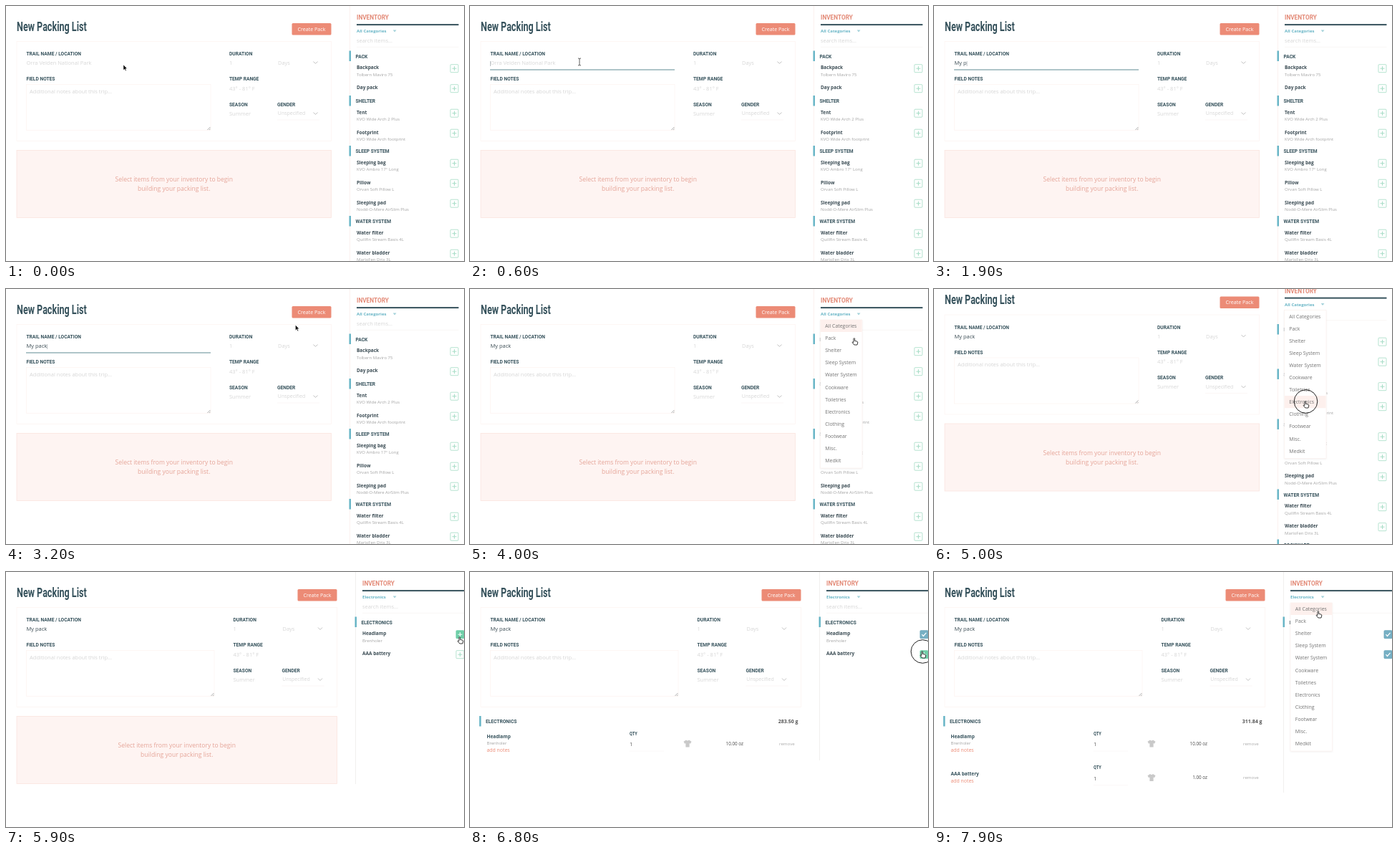
An HTML page for the animation above (8000 ms loop, 640 by 356 pixels).

```html
<!DOCTYPE html>
<html lang="en">
<head>
<meta charset="utf-8">
<title>New Packing List</title>
<style>
html, body { margin: 0; width: 100%; height: 100%; overflow: hidden; background: #fff; }
svg { display: block; width: 100%; height: 100%; font-family: "Open Sans", sans-serif; }
.head { font-family: Roboto, sans-serif; }
.menu { filter: drop-shadow(0 1px 1px rgba(0, 0, 0, .05)); }
</style>
</head>
<body>
<svg id="stage" viewBox="0 0 640 356"></svg>
<script>
const LOOP = 8000, STEP = 100;
const INK = '#36525c', DARK = '#3b4c54', TEAL = '#68b5c6', SALMON = '#ec8b76', GREEN = '#a4dcc5',
  PALE = '#d6d6d6', GREY = '#a3a3a3', BLUSH = '#fdf4f2';

const categories = ['All Categories', 'Pack', 'Shelter', 'Sleep System', 'Water System', 'Cookware',
  'Toiletries', 'Electronics', 'Clothing', 'Footwear', 'Misc.', 'Medkit'];
const inventory = [
  ['PACK', ['Backpack', 'Tolbern Maviro 75'], ['Day pack']],
  ['SHELTER', ['Tent', 'KVO Wide Arch 2 Plus'], ['Footprint', 'KVO Wide Arch footprint']],
  ['SLEEP SYSTEM', ['Sleeping bag', 'KVO Ambro 17° Long'], ['Pillow', 'Orvan Soft Pillow L'],
    ['Sleeping pad', 'Nodd-O-Mere AirSlim Plus']],
  ['WATER SYSTEM', ['Water filter', 'Quillfin Stream Basis 4L'], ['Water bladder', 'MarloFen Drix 3L']],
  ['COOKWARE']
];
const electronics = [['ELECTRONICS', ['Headlamp', 'Brenholer'], ['AAA battery']]];

// time, x, y, pointer shape until the next key
const path = [
  [0, 164, 82, 'arrow'], [100, 164, 82, 'arrow'], [400, 153, 78, 'beam'], [1000, 153, 78, ''],
  [2900, 153, 78, 'arrow'], [3400, 541, 35, 'hand'], [3800, 541, 35, 'hand'], [4000, 537, 69, 'hand'],
  [4800, 519, 157, 'hand'], [5300, 519, 157, 'arrow'], [5800, 634, 91, 'hand'], [6300, 634, 91, 'hand'],
  [6600, 632, 111, 'hand'], [7100, 632, 111, 'arrow'], [7500, 541, 36, 'hand'], [7700, 541, 36, 'hand'],
  [7900, 537, 55, 'hand'], [LOOP, 537, 55, 'hand']
];
const clicks = [400, 3500, 4900, 6100, 6700, 7500];
const keyTimes = [1000, 1400, 1500, 1900, 2000, 2100, 2100];
const pointers = {
  '': '',
  arrow: '<path d="M0 0V7.6L1.8 6 3 8.6 4.2 8 3 5.5H5.3Z" stroke="#fff" stroke-width=".5"/>',
  beam: '<path d="M-2-5Q0-5 0-4V4Q0 5-2 5M2-5Q0-5 0-4M0 4Q0 5 2 5" fill="none" stroke="#333" stroke-width=".8"/>',
  hand: '<path d="M-1 .5C-1-.6 .7-.6 .7 .5V3.4L4 4.2Q5 4.6 4.8 6L4 9H0L-3 5.6Q-2.5 4.4-1 5.5Z" fill="#fff" stroke="#222" stroke-width=".9"/>'
};

const ease = p => { p = Math.max(0, Math.min(1, p)); return p * p * (3 - 2 * p); };
const text = (x, y, s, size, fill, more = '') =>
  `<text x="${x}" y="${y}" font-size="${size}" fill="${fill}" ${more}>${s}</text>`;
const bold = (x, y, s, size, fill, more = '') => text(x, y, s, size, fill, 'font-weight="700" ' + more);
// headings use one condensed face
const head = (x, y, s, size = 7.75, fill = INK) =>
  `<g transform="translate(${x} ${y}) scale(.86 1)" class="head">${bold(0, 0, s, size, fill)}</g>`;
const rect = (x, y, w, h, fill, more = '') =>
  `<rect x="${x}" y="${y}" width="${w}" height="${h}" fill="${fill}" ${more}/>`;
const line = (d, stroke, w = 1) => `<path d="${d}" fill="none" stroke="${stroke}" stroke-width="${w}"/>`;

function pointerAt(t) {
  const i = Math.max(0, path.findIndex(k => k[0] > t) - 1);
  const [t0, x0, y0, shape] = path[i], [t1, x1, y1] = path[i + 1];
  const p = ease((t - t0) / (t1 - t0));
  return { x: x0 + (x1 - x0) * p, y: y0 + (y1 - y0) * p, shape };
}

function nameField(t, right) {
  const typed = keyTimes.filter(k => k <= t).length;
  const focused = t >= 500 && t < 3500;
  const last = typed ? keyTimes[typed - 1] : 500;
  const caret = focused && (t - last) % 1000 < 500 ? `<tspan dx="-1.7" font-weight="300">|</tspan>` : '';
  return (typed ? '' : text(28.5, 82.2, 'Orra Velden National Park', 7.5, PALE)) +
    text(28.5, 82.2, 'My pack'.slice(0, typed) + caret, 7.5, DARK) +
    (focused ? line(`M28 89H${right}`, '#5f8b93') : '');
}

function form(t, wide) {
  const edge = wide ? 462.5 : 454.5, a = wide ? 317.5 : 312, b = wide ? 385.5 : 379, r = wide ? 291 : 286;
  const chevron = y => line(`M${b + 50.5} ${y - 1.5}l3 3 3-3`, '#c2c2c2');
  return `<g transform="translate(15 34.5) scale(.7 1)" class="head">${text(0, 0, 'New Packing List', 18, INK, 'font-weight="600"')}</g>` +
    rect(edge - 55, 24, 55, 16.5, SALMON, 'rx="1.5"') +
    text(edge - 27.5, 34.6, 'Create Pack', 7.1, '#fff', 'text-anchor="middle"') +
    rect(15, 49.5, edge - 15, 139, 'none', `stroke="${BLUSH}" stroke-width=".8"`) +
    head(28.5, 69.2, 'TRAIL NAME / LOCATION') + nameField(t, r) +
    head(28.5, 104.2, 'FIELD NOTES') +
    rect(28.5, 109.5, r - 28.5, 64, 'none', `stroke="${BLUSH}" stroke-width=".8"`) +
    text(33, 121.6, 'Additional notes about this trip...', 7.55, PALE) +
    line(`M${r - 4.5} 173l4-4M${r - 2} 173l1.5-1.5`, '#888', .7) +
    head(a, 69.2, 'DURATION') + text(a, 82.2, '1', 7.5, PALE) +
    text(b + 1, 82, 'Days', 7.4, PALE) + chevron(79) +
    head(a, 104.2, 'TEMP RANGE') + text(a, 117.6, '43° - 81° F', 7.5, PALE) +
    head(a, 139.7, 'SEASON') + text(a, 152.8, 'Summer', 7.5, PALE) +
    head(b, 139.7, 'GENDER') + text(b + .8, 152.4, 'Unspecified', 7, PALE) + chevron(150) +
    line(`M${b} 159H${b + 59}`, '#faf5f4', .8);
}

function emptyPanel(wide) {
  const edge = wide ? 462.5 : 454.5, mid = (15 + edge) / 2;
  const center = (y, s) => text(mid, y, s, 8.55, '#e5a498', 'text-anchor="middle"');
  return rect(15, 201.5, edge - 15, 94, '#fef4f2', 'stroke="#fae4df" stroke-width=".8"') +
    center(245.4, 'Select items from your inventory to begin') + center(258.3, 'building your packing list.');
}

function packRow(y, [name, brand], weight) {
  const top = brand ? y - 7.5 : y - 2.7;
  return bold(23.5, top, name, 6.5, INK) +
    (brand ? text(23.5, y + 1.7, brand, 6, GREY) : '') +
    text(23.5, brand ? y + 11.5 : y + 7, 'add notes', 6.9, SALMON) +
    head(223, y - 11.6, 'QTY', 6.6) + text(223, y + 3.6, '1', 7.5, '#555') +
    line(`M223 ${y + 10.5}h48`, '#faf7f6', .8) +
    `<path d="M302 ${y - 5}q2 2 4 0l3.5 2.2-1.5 3-1.4-.7v5.5h-5.2v-5.5l-1.4 .7-1.5-3Z" fill="#c9c9c9"/>` +
    text(382, y + 2.4, weight, 6.3, '#444', 'text-anchor="end"') + text(432, y + 2, 'remove', 6.15, '#aaa');
}

function packList(added) {
  return rect(13, 201, 2.5, 14.5, TEAL) + head(22, 211.3, 'ELECTRONICS') +
    bold(458.5, 211, added > 1 ? '311.84 g' : '283.50 g', 7, '#555', 'text-anchor="end"') +
    packRow(239.5, electronics[0][1], '10.00 oz') +
    (added > 1 ? packRow(287, electronics[0][2], '1.00 oz') : '');
}

function toggle(x, y, state) {
  const plus = c => line(`M${x - 3} ${y}h6M${x} ${y - 3}v6`, c);
  const box = (fill, stroke) => rect(x - 5.5, y - 5.5, 11, 11, fill, `rx="1" stroke="${stroke}" stroke-width=".8"`);
  if (state === 'done') return box('#77b0c4', '#6aa5ba') + line(`M${x - 3} ${y}l2 2.3 4-4.6`, '#fff', 1.2);
  return state === 'hover' ? box('#6fcfa8', '#6fcfa8') + plus('#fff') : box('#fff', GREEN) + plus(GREEN);
}

function sidebar(wide, added, cursor) {
  const x = wide ? 488.5 : 480.5;
  const bottom = !wide ? 380 : [296, 263, 308][added];
  let y = 70, n = 0;
  let out = line(`M${x} 0V${bottom}`, wide ? '#eeebea' : '#fbedeb', .8) +
    head(x + 9.5, 19.3, 'INVENTORY', 9.6, '#e38a77') +
    rect(x + 9.5, 25.1, 142.5, 2, INK) +
    bold(x + 9.5, 37.4, wide ? 'Electronics' : 'All Categories', 6.05, TEAL) +
    '<path d="M540.7 33.4h4.8l-2.4 3.2Z" fill="#a3d2da"/>' +
    text(x + 9.5, 50.7, 'search items...', 7.45, PALE) + line(`M${x + 9.5} 57.3h142.5`, '#f8f4f3', .8);
  for (const [title, ...items] of wide ? electronics : inventory) {
    out += rect(x - 1, y - 7.5, 2.5, 14.5, TEAL) + head(x + 8, y + 2.6, title);
    y += 16;
    for (const [name, brand] of items) {
      const hover = wide && cursor.x > 628 && Math.abs(cursor.y - y - 1) < 6;
      out += bold(x + 9.5, y + 2.3, name, 6.5, DARK) +
        (brand ? text(x + 9.5, y + 11.6, brand, 6, GREY) : '') +
        toggle(x + 146, y + 1.2, wide && n < added ? 'done' : hover ? 'hover' : '');
      y += 28;
      n++;
    }
    const last = items[items.length - 1];
    y += last && last[1] ? -2 : -9.5;
  }
  return out;
}

function menu(wide, hover) {
  const x = wide ? 498 : 489.5;
  const row = Math.floor((hover.y - 42.7) / 17.1);
  return rect(x, 43, 58.5, 207, '#fff', 'class="menu" stroke="#faeeeb" stroke-width=".6"') +
    (row >= 0 && row < categories.length ? rect(x + .4, 42.9 + row * 17.1, 57.7, 17.1, '#fdf0ed') : '') +
    categories.map((c, i) => text(x + 6.8, 54 + i * 17.1, c, 6.95, '#737373')).join('');
}

function scene(t) {
  const wide = t >= 5200, added = (t >= 6200) + (t >= 6900);
  const open = (t >= 3600 && t < 5200) || t >= 7600;
  const scroll = wide ? 0 : 13.5 * ease((t - 4200) / 300);
  const cursor = pointerAt(t), before = pointerAt(Math.max(0, t - STEP));
  const ring = clicks.some(c => t >= c && t < c + 200);
  return `<g transform="translate(0 ${-scroll})">` + form(t, wide) +
    (added ? packList(added) : emptyPanel(wide)) + sidebar(wide, added, cursor) +
    (open ? menu(wide, { y: before.y + scroll }) : '') + '</g>' +
    `<g transform="translate(${cursor.x} ${cursor.y})">` +
    (ring ? '<circle cx=".5" r="16.3" fill="none" stroke="#222" stroke-width="1"/>' : '') +
    pointers[cursor.shape] + '</g>';
}

const stage = document.getElementById('stage');
const start = performance.now();
let shown = -1;
function draw() {
  const t = Math.floor((performance.now() - start) % LOOP / STEP) * STEP;
  if (t !== shown) stage.innerHTML = scene(shown = t);
  requestAnimationFrame(draw);
}
draw();
</script>
</body>
</html>
```
